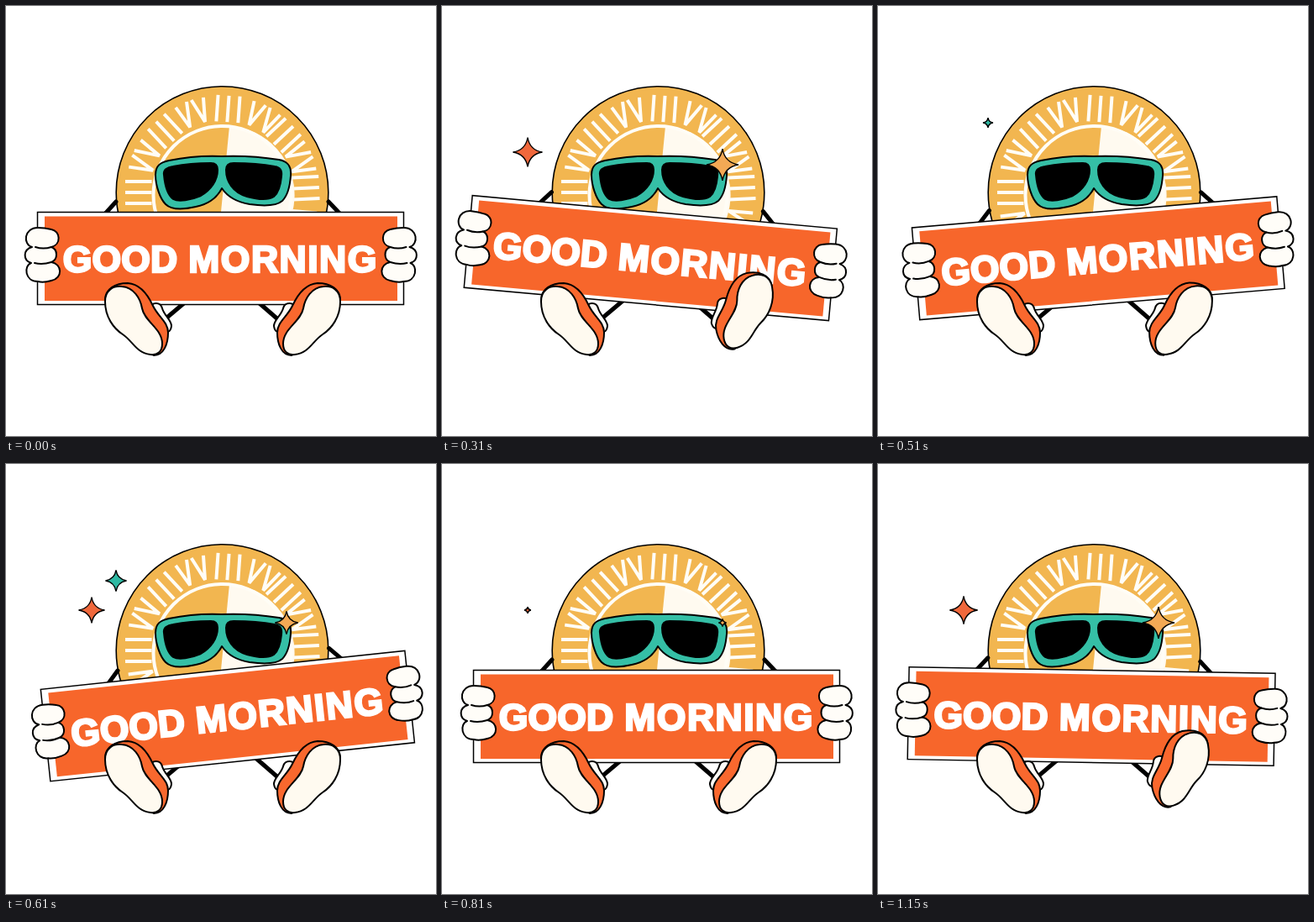
Write an HTML page that moves like this. It is 512 by 512 pixels and loops after 1170 ms.

```html
<!DOCTYPE html>
<html lang="en">
<head>
<meta charset="utf-8">
<title>Good morning</title>
<style>
  html, body { margin: 0; width: 100%; height: 100%; overflow: hidden; background: #fff; }
  svg { display: block; width: 100%; height: 100%; }
  .ink { stroke: #000; stroke-width: 2; stroke-linejoin: round; stroke-linecap: round; }
  .limb { fill: none; stroke: #000; stroke-width: 5; stroke-linecap: round; }
  .rays { fill: none; stroke: #fffdf6; stroke-width: 4; }
  .star { stroke: #000; stroke-width: 1.4; vector-effect: non-scaling-stroke; }
  text { font: bold 44.5px "Liberation Sans", Arial, sans-serif; fill: #fff; stroke: #fff; stroke-width: 2.6; }
</style>
</head>
<body>
<svg viewBox="0 0 512 512">
  <defs>
    <path id="bars" d="M-13 -84V-115.5M0 -84V-115.5M13 -84V-115.5"/>
    <path id="vees" d="M-17.5 -114L-9.5 -86L-3 -116M3 -116L9.5 -86L17.5 -114"/>
    <g id="hand" class="ink" fill="#fffdf8">
      <path d="M31 287C20 284 21 264 38 264C46 264 50 265 54 266C65 268 66 284 54 287C62 290 62 302 54 305C67 307 68 324 54 327C47 329 42 329 38 328C22 328 21 309 30 306C20 303 20 290 31 287Z"/>
      <path d="M54 287C48 289 41 289 35 287M54 305C48 307 41 308 34 306" fill="none"/>
    </g>
    <g id="shoe" class="ink">
      <path d="M172 360C173 352 184 352 186 360C188 368 197 374 197 381C196 389 191 390 187 385Z" fill="#fffdf8"/>
      <path d="M118 350C118 337 130 330 145 330C160 331 169 344 175 357C181 370 193 376 193 389C193 402 188 416 176 416L150 398Z" fill="#f9682e"/>
      <path d="M118 352C118 338 128 333 138 334C152 335 160 348 162 360C165 376 186 384 186 402C186 412 180 416 172 415C155 413 151 399 139 391C128 384 118 370 118 352Z" fill="#fffaf0"/>
    </g>
    <path id="spark" d="M0 -1Q.14 -.14 1 0Q.14 .14 0 1Q-.14 .14 -1 0Q-.14 -.14 0 -1Z"/>
  </defs>

  <rect width="512" height="512" fill="#fff"/>

  <circle cx="257.5" cy="222" r="126.3" fill="#f2b650" stroke="#000" stroke-width="1.6"/>
  <g id="rays" class="rays"></g>
  <path d="M266 143A82 82 0 0 1 257 307L256 245Z" fill="#fffaf0"/>
  <circle cx="257.5" cy="225" r="82" fill="none" stroke="#fffdf6" stroke-width="4"/>

  <path class="ink" fill="#35bfa6" d="M178 201C178 190 184 186 194 184C214 180 236 178 257 179C283 178 306 180 325 183C336 185 340 191 339 202C338 216 335 226 329 232C321 239 304 238 290 236C272 233 263 226 257 217C251 229 241 236 226 239C213 242 198 244 190 236C183 229 178 213 178 201Z"/>
  <path class="ink" d="M188 201C187 195 192 192 199 191C214 188 230 187 244 187C250 187 252 190 252 195C252 208 244 219 232 226C220 231 206 234 199 230C192 225 189 212 188 201Z"/>
  <path class="ink" d="M262 195C262 189 265 187 271 187C288 187 304 188 320 191C327 192 329 196 328 203C327 214 324 223 319 227C311 232 298 230 287 227C270 222 262 209 262 195Z"/>

  <path class="limb" d="M226 342L188 374M288 342L326 375"/>

  <g id="board">
    <path class="limb" d="M131 233L112 254M384 233L404 254"/>
    <rect x="37.5" y="245.5" width="436" height="110" fill="#fff" stroke="#000" stroke-width="1.5"/>
    <rect x="46" y="250.5" width="420" height="100.5" fill="#f7662b"/>
    <text x="67.8" y="317.3" letter-spacing=".1">GOOD</text>
    <text x="217.3" y="317.3" letter-spacing="1.5">MORNING</text>
    <use href="#hand"/>
    <use href="#hand" transform="translate(511.5 0) scale(-1 1)"/>
  </g>

  <use href="#shoe"/>
  <g id="foot"><use href="#shoe" transform="translate(516 0) scale(-1 1)"/></g>

  <g id="stars"></g>
</svg>
<script>
const LOOP = 1170;
const SWAY = 1075, KICK = 845, TWINKLE = 415;
const NS = "http://www.w3.org/2000/svg";
const byId = id => document.getElementById(id);

function add(parent, tag, attrs) {
  const el = document.createElementNS(NS, tag);
  for (const key in attrs) el.setAttribute(key, attrs[key]);
  return byId(parent).appendChild(el);
}

// Bars and double vees alternate around the sun's rim
[-113, -90, -66, -43, -20, 4, 28, 47, 67, 87, 111].forEach((a, i) =>
  add("rays", "use", { href: i % 2 ? "#bars" : "#vees", transform: `translate(257.5 222) rotate(${a})` }));

const stars = [
  { x: 131, y: 139, size: 13, from: 60, to: 290, gain: 1, fill: "#2fb9a3" },
  { x: 102, y: 174, size: 17.5, from: 110, to: 414, gain: 1.15, fill: "#f0683c" },
  { x: 334, y: 189, size: 19, from: 135, to: 414, gain: 1.15, fill: "#f3a955" }
];
const sparkPath = byId("spark").getAttribute("d");
for (const s of stars) s.el = add("stars", "path", { class: "star", fill: s.fill, d: sparkPath });

const ease = u => (1 - Math.cos(Math.PI * u)) / 2;

// [time, angle] poses of the board, eased in between
const poses = [[0, 0], [20, 0], [235, 6.6], [585, -6.3], [780, 0], [SWAY, 0]];

function swayAt(t) {
  const i = poses.findIndex(p => p[0] > t);
  const [t0, a0] = poses[i - 1], [t1, a1] = poses[i];
  return a0 + (a1 - a0) * ease((t - t0) / (t1 - t0));
}

function kickAt(t) {
  const u = (t - 40) / 500;
  return u > 0 && u < 1 ? ease(2 * u) : 0;
}

function starSize(s, t) {
  const u = (t - s.from) / (s.to - s.from);
  return u > 0 && u < 1 ? s.size * Math.min(1, s.gain * Math.sin(Math.PI * u)) : 0;
}

// The picture changes in steps of 50 ms, with a longer first and a short last one
function stepTime(t) {
  if (t < 60) return 0;
  if (t >= 1150) return 1150;
  return 60 + 50 * Math.floor((t - 60) / 50);
}

function draw(t) {
  byId("board").setAttribute("transform", `rotate(${swayAt(t % SWAY)} 255.5 221)`);
  const k = kickAt(t % KICK);
  byId("foot").setAttribute("transform", `translate(${3 * k} ${-2 * k}) rotate(${-11 * k} 313 386)`);
  for (const s of stars) {
    const r = starSize(s, t % TWINKLE);
    s.el.setAttribute("visibility", r > 0.5 ? "visible" : "hidden");
    s.el.setAttribute("transform", `translate(${s.x} ${s.y}) scale(${Math.max(r, 0.5)})`);
  }
}

const start = performance.now();
function tick() {
  draw(stepTime((performance.now() - start) % LOOP));
  requestAnimationFrame(tick);
}
tick();
</script>
</body>
</html>
```
